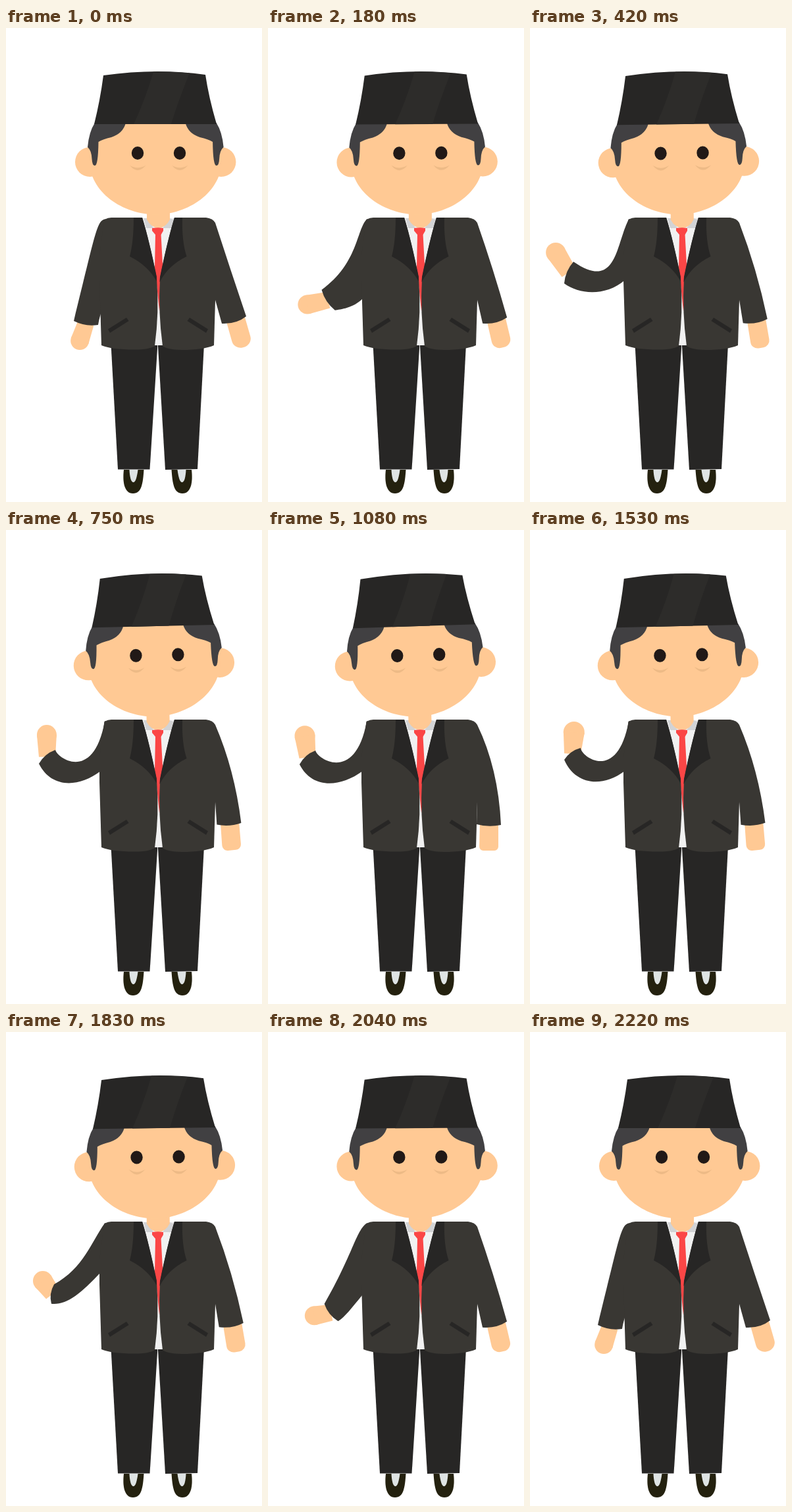
These frames come from a looping animation (389 px wide and 720 px high, 2.25 s). An HTML page with a canvas:

```html
<!DOCTYPE html>
<html lang="en">
<head>
<meta charset="utf-8">
<title>Waving man</title>
<style>
html, body { margin: 0; width: 100%; height: 100%; overflow: hidden; background: #fff; }
canvas { display: block; }
</style>
</head>
<body>
<canvas id="stage" width="389" height="720"></canvas>
<script>
const ctx = document.getElementById('stage').getContext('2d');
const LOOP = 2250, STEP = 30, END = 2220, SWAY_PEAK = 1150;
const RAD = Math.PI / 180;
const COLOR = {
  skin: '#ffc994', suit: '#393733', dark: '#272625', shine: '#2d2c2a', hair: '#414042',
  shirt: '#f1f1f1', collar: '#d2d3d5', tie: '#fb4646', eye: '#211917', bag: '#edba86',
  shoe: '#24210f', sock: '#dfe4e4'
};

// Waving arm: time, cuff x, y, angle, half width, hand angle, length, radius,
// then upper edge controls, lower edge controls and armpit height.
const ARM = [
  [0,    121.5, 448,    9, 18.7, 109, 28.6, 14,   138, 293, 136, 312, 141, 446, 142, 440, 434],
  [420,  59, 371.5,   113, 18,   237, 36.5, 15,   130, 330, 132, 400, 75, 405, 115, 408, 383],
  [750,  62.5, 344.5, 140, 16.3, 269, 33.5, 15,   133, 384, 78, 347, 68, 391, 108, 393, 366],
  [1080, 60, 345.5,   139, 16,   263, 33,   15.5, 133, 384, 76, 349, 66, 392, 107, 393, 366],
  [1530, 64.5, 340,   144, 15.4, 274, 33,   16,   133, 384, 78, 345, 68, 386, 108, 393, 366],
  [1830, 71, 398,      98, 15,   233, 25,   15,   130, 318, 118, 359, 92, 415, 112, 399, 365]
];
ARM.push([END, ...ARM[0].slice(1)]);

// Smooth curve through the keyed poses.
function poseAt(time) {
  let i = 0;
  while (i < ARM.length - 2 && time >= ARM[i + 1][0]) i++;
  const a = ARM[i], b = ARM[i + 1];
  const before = ARM[i - 1] || a, after = ARM[i + 2] || b;
  const span = b[0] - a[0], s = (time - a[0]) / span;
  const s2 = s * s, s3 = s2 * s;
  return a.slice(1).map((v, k) => {
    const n = k + 1;
    const slopeA = (b[n] - before[n]) / (b[0] - before[0]);
    const slopeB = (after[n] - a[n]) / (after[0] - a[0]);
    return v * (2 * s3 - 3 * s2 + 1) + b[n] * (3 * s2 - 2 * s3)
      + span * (slopeA * (s3 - 2 * s2 + s) + slopeB * (s3 - s2));
  });
}

function shape(color, d) {
  ctx.fillStyle = color;
  ctx.fill(new Path2D(d));
}

function ellipse(color, x, y, rx, ry = rx) {
  ctx.fillStyle = color;
  ctx.beginPath();
  ctx.ellipse(x, y, rx, ry, 0, 0, Math.PI * 2);
  ctx.fill();
}

// Draws once as is and once reflected about x = axis.
function mirrored(axis, draw) {
  draw();
  ctx.save();
  ctx.translate(2 * axis, 0);
  ctx.scale(-1, 1);
  draw();
  ctx.restore();
}

function drawLegs() {
  shape(COLOR.dark, 'M159.5 480L170 670.5H218.5L230.2 484V480Z');
  shape(COLOR.dark, 'M231 480V484L242 671L291 670L301 480Z');
  mirrored(230.5, () => {
    shape(COLOR.shoe, 'M179 671C177 688 179 707 193 707C206 707 208 692 209.5 671Z');
    shape(COLOR.sock, 'M187.5 671C188 682 190 690 193.5 690C197 690 199 682 200.5 671Z');
  });
}

function drawWavingArm(time) {
  const [cx, cy, cuffDeg, half, handDeg, reach, radius,
    ux1, uy1, ux2, uy2, lx1, ly1, lx2, ly2, armpit] = poseAt(time);
  const cos = Math.cos(cuffDeg * RAD), sin = Math.sin(cuffDeg * RAD);
  const hx = Math.cos(handDeg * RAD), hy = Math.sin(handDeg * RAD);
  const tipX = cx + hx * reach, tipY = cy + hy * reach;
  const wrist = 12.5;

  ellipse(COLOR.skin, tipX, tipY, radius);
  ctx.beginPath();
  ctx.moveTo(cx - hy * wrist, cy + hx * wrist);
  ctx.lineTo(tipX - hy * radius, tipY + hx * radius);
  ctx.lineTo(tipX + hy * radius, tipY - hx * radius);
  ctx.lineTo(cx + hy * wrist, cy - hx * wrist);
  ctx.fill();

  ctx.fillStyle = COLOR.suit;
  ctx.beginPath();
  ctx.moveTo(150, 290.5);
  ctx.bezierCurveTo(ux1, uy1, ux2, uy2, cx - cos * half, cy - sin * half);
  ctx.quadraticCurveTo(cx - sin * 6, cy + cos * 6, cx + cos * half, cy + sin * half);
  ctx.bezierCurveTo(lx1, ly1, lx2, ly2, 144, armpit);
  ctx.lineTo(160, armpit);
  ctx.lineTo(160, 290);
  ctx.fill();
}

function drawRestingArm(sway) {
  const k = sway / 0.939;
  const mix = (x0, y0, x1, y1) => [x0 + (x1 - x0) * k, y0 + (y1 - y0) * k];
  const topLeft = mix(334, 443, 322, 440), topRight = mix(362, 436, 350, 440);
  const lowLeft = mix(347, 489, 321, 487), lowRight = mix(375, 481, 350, 487);
  const corner = 13.5 - 7.5 * k;

  ctx.fillStyle = COLOR.skin;
  ctx.beginPath();
  ctx.moveTo(...topLeft);
  ctx.arcTo(...lowLeft, ...lowRight, corner);
  ctx.arcTo(...lowRight, ...topRight, corner);
  ctx.lineTo(...topRight);
  ctx.fill();

  ctx.fillStyle = COLOR.suit;
  ctx.beginPath();
  ctx.moveTo(300, 291);
  ctx.lineTo(318, 296);
  ctx.quadraticCurveTo(...mix(341, 367, 350, 362), ...mix(365, 438, 354, 448));
  ctx.quadraticCurveTo(...mix(350, 450, 335, 452), ...mix(328, 449, 317, 447));
  ctx.lineTo(318, 413);
  ctx.lineTo(300, 413);
  ctx.fill();
}

function drawShirt(tilt) {
  shape(COLOR.shirt, 'M206 288.500H257L240 400V482H224V400Z');
  shape(COLOR.collar, 'M209 289L213 304H224L216 289Z');
  shape(COLOR.collar, 'M248 289L256 291L252 304H238Z');
  tilt(() => shape(COLOR.skin, 'M214 270H249V291Q243 303 232 304Q220 303 214 291Z'));
  shape(COLOR.tie, 'M222 304Q231 302.500 239 304V308L235.500 314H227L222 308Z');
  shape(COLOR.tie, 'M227 313H235.500L239 378L233 430L228 380L226 365Z');
}

function drawJacket() {
  shape(COLOR.suit, 'M149.500 291Q155 288 160 288H207Q217.500 322 229 380Q233 432 226 483Q218 488.500 195 488.500Q160 488.500 145 482L142 383V345Z');
  shape(COLOR.suit, 'M256 288H304Q314 289 318 296V413L316 482Q300 489 267 489Q245 488.500 238 483Q231 432 234 380Q245.500 322 256 288Z');
  shape(COLOR.dark, 'M194 288H207Q217.500 322 229 378V385Q216 361 188 347Q194 325 194 288Z');
  shape(COLOR.dark, 'M256 288H268Q267 325 274.500 347Q246 361 233.500 386L234 378Q245.500 322 256 288Z');
  mirrored(231, () => shape(COLOR.dark, 'M155 457.500L183 440L186.500 445L158 463Z'));
}

function drawHead() {
  mirrored(227.2, () => ellipse(COLOR.skin, 127.5, 203.5, 22.5));
  shape(COLOR.skin, 'M126.500 200C126.500 250 178 283.300 227.500 283.300C276 283.300 328 250 328 200L314 140H140Z');
  mirrored(227.3, () => shape(COLOR.hair,
    'M135 144Q126 158 124 181Q130 186 130.500 199Q131 209 135 209Q140 209 140.500 173Q147 169 160 166Q178 160 182 144Z'));
  shape(COLOR.dark, 'M148 72Q228 60.500 303 71Q308 105 320 146H134Q143 110 148 72Z');
  shape(COLOR.shine, 'M224 66.500Q252 66 279 68.500Q262 110 251 146H194Q211 110 224 66.500Z');
  for (const x of [200, 264]) {
    ellipse(COLOR.eye, x, 190, 9.2, 10);
    shape(COLOR.bag, `M${x - 12} 208.500Q${x} 223.500 ${x + 12.5} 208.500Q${x} 216 ${x - 12} 208.500Z`);
  }
}

function draw(time) {
  const sway = time < SWAY_PEAK ? time / SWAY_PEAK : (END - time) / (END - SWAY_PEAK);
  const tilt = part => {
    ctx.save();
    ctx.translate(232, 306);
    ctx.rotate(-1.97 * RAD * sway);
    ctx.translate(-232, -306);
    part();
    ctx.restore();
  };
  ctx.fillStyle = '#fff';
  ctx.fillRect(0, 0, 389, 720);
  drawLegs();
  drawWavingArm(time);
  drawRestingArm(sway);
  drawShirt(tilt);
  drawJacket();
  tilt(drawHead);
}

const start = performance.now();
function tick() {
  const elapsed = (performance.now() - start) % LOOP;
  draw(Math.min(END, Math.floor(elapsed / STEP) * STEP));
  requestAnimationFrame(tick);
}
tick();
</script>
</body>
</html>
```
